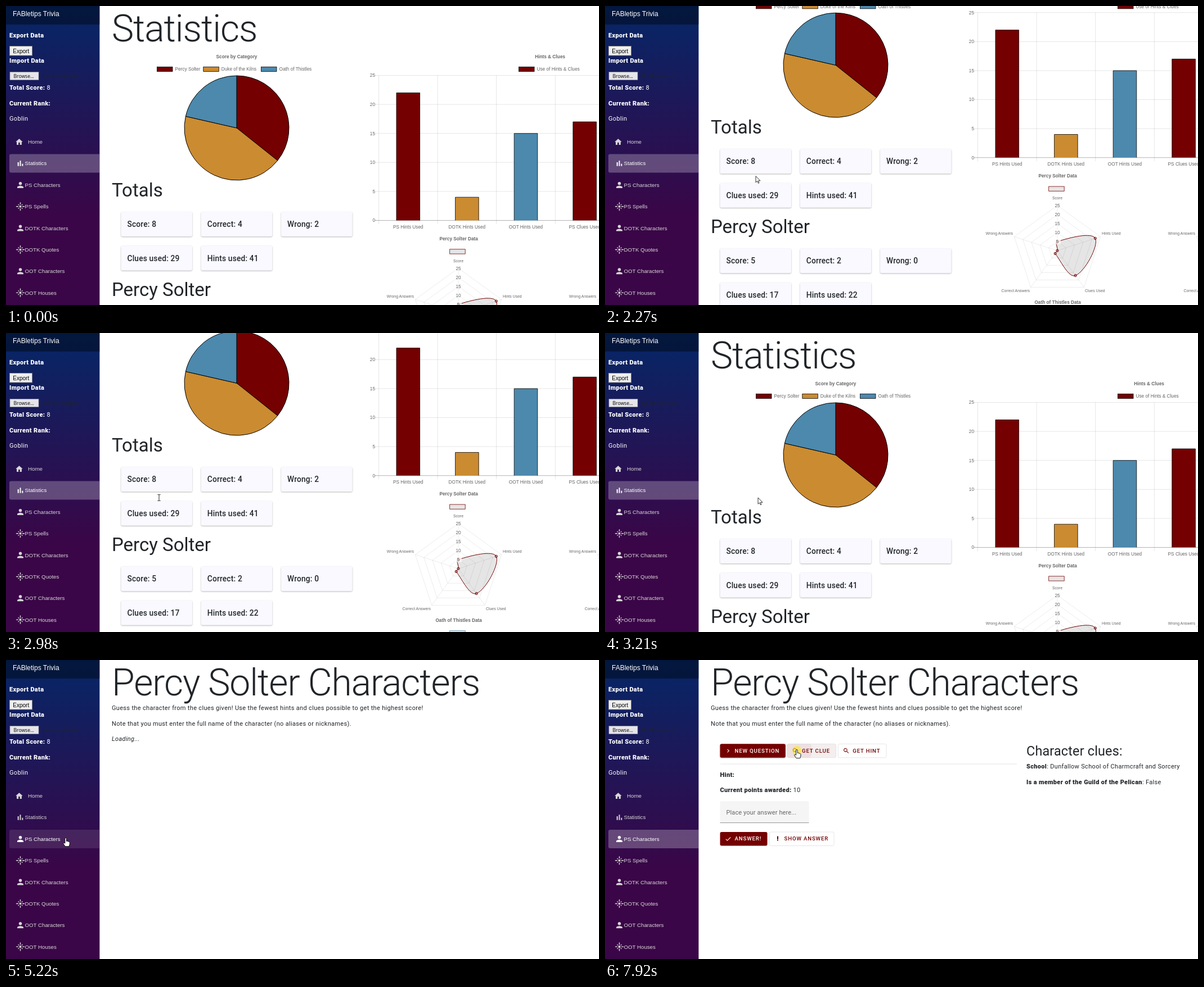
An HTML page for the animation above (7.99 s loop, 1054 by 532 pixels).

```html
<!DOCTYPE html>
<html lang="en">
<head>
<meta charset="utf-8">
<title>Trivia statistics</title>
<style>
html, body { margin: 0; width: 100%; height: 100%; overflow: hidden; background: #fff; }
svg { display: block; width: 100vw; height: 100vh; cursor: default; }
text { font: 11px Roboto, sans-serif; letter-spacing: .325px; fill: #212529; white-space: pre; }
.b { font-weight: 900; }
.i { font-style: italic; }
.h1 { font-size: 66px; font-weight: 300; letter-spacing: -1.03px; }
.h2 { font-size: 33px; letter-spacing: 0; }
.h3 { font-size: 23.4px; letter-spacing: .17px; }
.label { font-size: 13.75px; font-weight: 500; letter-spacing: .17px; }
.btn { font-size: 9.63px; font-weight: 500; letter-spacing: .86px; fill: #740001; }
.btn.solid { fill: #fff; }
.hint { letter-spacing: .1px; fill: #666; }
.chart text { font: 8.25px "Liberation Sans", Arial, sans-serif; letter-spacing: 0; fill: #666; }
.chart .title { font-weight: 700; }
.chart .small { font-size: 6.9px; }
.side text { fill: #fff; }
.side .ui { font: 10px "Liberation Sans", Arial, sans-serif; letter-spacing: 0; }
.side .brand { font-size: 12px; }
.side .file { font: 8.6px "Open Sans", sans-serif; letter-spacing: 0; }
.side .dark { fill: #000; }
.side .faint { fill: #212529; }
.nav { fill: #d7d7d7; }
.side .nav text { font: 9.7px "Liberation Sans", Arial, sans-serif; letter-spacing: 0; fill: inherit; }
.raised { filter: drop-shadow(0 1px 1px rgba(0,0,0,.28)); }
</style>
</head>
<body>
<script>
const LOOP = 7990;
const RED = '#740001', GOLD = '#cb8b31', BLUE = '#4c89ad', GRID = 'rgba(0,0,0,.1)';
const WORKS = ['Percy Solter', 'Duke of the Kilns', 'Oath of Thistles'];

const text = (x, y, s, cls = '', anchor = 'start') =>
  `<text x="${x}" y="${y}" class="${cls}" text-anchor="${anchor}">${s}</text>`;
const rect = (x, y, w, h, fill, more = '') =>
  `<rect x="${x}" y="${y}" width="${w}" height="${h}" fill="${fill}" ${more}/>`;
const path = (d, more = '') => `<path d="${d}" ${more}/>`;
const icon = (name, x, y, k, more = '') =>
  `<g transform="translate(${x} ${y}) scale(${k})" ${more}>${path(ICONS[name])}</g>`;
const range = n => [...Array(n).keys()];

const ICONS = {
  home: 'M10 20v-6h4v6h5v-8h3L12 3 2 12h3v8z',
  bars: 'M5 9.2h3V19H5zM10.6 5h2.8v14h-2.8zm5.6 8H19v6h-2.8z',
  person: 'M12 12a4 4 0 1 0 0-8 4 4 0 0 0 0 8zm0 2c-2.67 0-8 1.34-8 4v2h16v-2c0-2.66-5.33-4-8-4z',
  flare: 'M1 11h6v2H1zM17 11h6v2h-6zM11 1h2v6h-2zM11 17h2v6h-2zM9 12a3 3 0 1 1 6 0 3 3 0 0 1-6 0z' +
    'M7.05 5.64l2.12 2.12-1.41 1.41-2.12-2.12zM16.95 5.64l1.41 1.41-2.12 2.12-1.41-1.41z' +
    'M7.76 14.83l1.41 1.41-2.12 2.12-1.41-1.41zM16.24 14.83l2.12 2.12-1.41 1.41-2.12-2.12z',
  chevron: 'M10 6L8.6 7.4l4.6 4.6-4.6 4.6L10 18l6-6z',
  search: 'M15.5 14h-.8l-.3-.3a6.5 6.5 0 1 0-.7.7l.3.3v.8l5 5 1.5-1.5zm-6 0a4.5 4.5 0 1 1 0-9 4.5 4.5 0 0 1 0 9z',
  check: 'M9 16.2L4.8 12l-1.4 1.4L9 19 21 7l-1.4-1.4z',
  bang: 'M10 3h4v11h-4zM10 17a2 2 0 1 0 4 0 2 2 0 0 0-4 0z'
};

// Sidebar
const SIDE = 166.4;
const NAV = [['home', 'Home'], ['bars', 'Statistics'], ['person', 'PS Characters'], ['flare', 'PS Spells'],
  ['person', 'DOTK Characters'], ['flare', 'DOTK Quotes'], ['person', 'OOT Characters'], ['flare', 'OOT Houses']];
const navItem = ([name, label], i) => {
  const y = 241.7 + i * 38.35;
  const mark = i ? icon(name, 17.25, y - 8.25, .6875) : icon(name, 15.9, y - 7.4, .63);
  return `<g class="nav">${path(`M${SIDE} ${y - 16.5}H9a3 3 0 0 0-3 3v27a3 3 0 0 0 3 3H${SIDE}z`, 'fill="#fff" fill-opacity="0"')}
    ${mark}${text(i ? 33.5 : 39, y + 3.4, label)}</g>`;
};
const sidebar = () => `<g class="side">
  ${rect(0, 0, SIDE, 532, 'url(#night)')}${rect(0, 0, SIDE, 33, 'rgba(0,0,0,.4)')}
  ${text(12, 18, 'FABletips Trivia', 'ui brand')}
  ${text(6, 55.8, 'Export Data', 'b')}
  ${rect(6.5, 71.5, 40, 16.5, '#efefef', 'stroke="#858585"')}${text(12.3, 83.5, 'Export', 'ui dark')}
  ${text(6, 100.6, 'Import Data', 'b')}
  ${rect(7, 117.5, 51, 14, '#e6e6ea', 'stroke="#8f8f9d" stroke-width=".7"')}${text(13.5, 128, 'Browse...', 'file dark')}
  ${text(65, 128, 'No file selected.', 'file faint')}
  ${text(6, 149.2, '<tspan class="b">Total Score:</tspan> 8')}
  ${text(6, 176.5, 'Current Rank:', 'b')}${text(6, 203.8, 'Goblin')}
  ${NAV.map(navItem).join('')}</g>`;

// Statistics page
const CARDS = [];
const section = (title, top, labels) => text(188, top, title, 'h2') + labels.map((s, i) => {
  const x = 204.5 + i % 3 * 142.3, y = top + 27 + (i > 2 ? 60.5 : 0);
  CARDS.push({ x, y });
  return rect(x, y, 126.5, 44, '#f9f9ff', 'rx="2.75" class="raised"') + text(x + 11, y + 27, s, 'label');
}).join('');

const legend = (x, y, fill, s = '', stroke = '#000') =>
  rect(x, y, 27.5, 8.25, fill, `stroke="${stroke}" stroke-width=".8"`) + text(x + 32, y + 7, s);

const polar = (cx, cy, r, turn) =>
  [cx + r * Math.sin(turn * 2 * Math.PI), cy - r * Math.cos(turn * 2 * Math.PI)];

const pie = () => {
  const [cx, cy, r] = [410, 217, 93];
  let sum = 0;
  return [[5, RED], [6, GOLD], [3, BLUE]].map(([n, fill]) => {
    const from = polar(cx, cy, r, sum / 14), to = polar(cx, cy, r, (sum += n) / 14);
    return path(`M${cx} ${cy}L${from}A${r} ${r} 0 0 1 ${to}Z`, `fill="${fill}" stroke="#000"`);
  }).join('') + text(410, 92.5, 'Score by Category', 'title', 'middle') +
    [268.5, 350.8, 453.5].map((x, i) => legend(x, 108.3, [RED, GOLD, BLUE][i], WORKS[i])).join('');
};

const barChart = () => {
  const base = 381.5, unit = 10.32, step = 104.6;
  return text(967, 92.5, 'Hints &amp; Clues', 'title', 'middle') +
    legend(911.5, 108.3, RED, 'Use of Hints &amp; Clues') +
    range(6).map(i => path(`M655 ${base - i * 5 * unit}H1054`, `stroke="${i ? GRID : 'rgba(0,0,0,.3)'}"`) +
      text(656, base - i * 5 * unit + 2.8, i * 5, '', 'end')).join('') +
    range(4).map(i => path(`M${662.5 + i * step} 123.5V388`, `stroke="${GRID}"`)).join('') +
    [[22, RED, 'PS Hints Used'], [4, GOLD, 'DOTK Hints Used'], [15, BLUE, 'OOT Hints Used'], [17, RED, 'PS Clues Used']]
      .map(([n, fill, s], i) => {
        const x = 714.8 + i * step;
        return path(`M${x - 20.8} ${base}v${-n * unit}h41.6v${n * unit}`, `fill="${fill}" stroke="#000" stroke-width=".8"`) +
          text(x, 395.8, s, '', 'middle');
      }).join('');
};

// Closed curve through the points, with the handles scaled by neighbour distance
const smoothLoop = pts => {
  const n = pts.length, at = i => pts[(i + n) % n];
  const dist = (a, b) => Math.hypot(a[0] - b[0], a[1] - b[1]);
  const handle = (i, side) => {
    const a = at(i - 1), c = at(i), b = at(i + 1), d = side < 0 ? dist(a, c) : dist(c, b);
    const k = side * .4 * d / (dist(a, c) + dist(c, b));
    return [c[0] + k * (b[0] - a[0]), c[1] + k * (b[1] - a[1])];
  };
  return `M${at(0)}` + pts.map((_, i) => `C${handle(i, 1)} ${handle(i + 1, -1)} ${at(i + 1)}`).join('');
};

const radar = (cx, values) => {
  const cy = 547, point = (v, i) => polar(cx, cy, v * 3.22, i / 5);
  const pts = values.map(point);
  const web = range(5).map(k => path(`M${range(5).map(i => point(k * 5 + 5, i)).join('L')}Z`)).join('') +
    range(5).map(i => path(`M${cx} ${cy}L${point(25, i)}`)).join('');
  return `<g fill="none" stroke="${GRID}" stroke-width=".8">${web}</g>` +
    text(cx, 455.7, 'Score', 'small', 'middle') + text(cx + 79, 519, 'Hints Used', 'small') +
    text(cx + 49, 620.7, 'Clues Used', 'small') + text(cx - 49, 620.7, 'Correct Answers', 'small', 'end') +
    text(cx - 79, 519, 'Wrong Answers', 'small', 'end') +
    (pts.length ? path(smoothLoop(pts), `fill="${GRID}" stroke="${RED}"`) : '') +
    pts.map(([x, y]) => `<circle cx="${x}" cy="${y}" r="2.1" fill="${GRID}" stroke="${RED}"/>`).join('') +
    range(5).map(k => rect(cx - 6, cy - 21 - k * 16.1, 12, 9.5, 'rgba(255,255,255,.7)') +
      text(cx, cy - 13 - k * 16.1, k * 5 + 5, '', 'middle')).join('');
};

const stats = () => `<g id="stats">${text(188, 63, 'Statistics', 'h1')}
  <g class="chart">${pie()}${barChart()}
    ${text(804.7, 417, WORKS[0] + ' Data', 'title', 'middle')}${legend(788.7, 432.8, GRID, '', RED)}
    ${radar(804, [5, 22, 17, 2, 0])}${radar(1128, [])}
    ${text(804.7, 641.5, WORKS[2] + ' Data', 'title', 'middle')}${legend(788.7, 657.5, GRID, '', BLUE)}</g>
  ${section('Totals', 339, ['Score: 8', 'Correct: 4', 'Wrong: 2', 'Clues used: 29', 'Hints used: 41'])}
  ${section(WORKS[0], 516, ['Score: 5', 'Correct: 2', 'Wrong: 0', 'Clues used: 17', 'Hints used: 22'])}
  ${text(188, 691, WORKS[1], 'h2')}</g>`;

// Question page
const button = (id, x, y, w, name, label, solid, more = '') =>
  rect(x, y, w, 24.5, solid ? RED : '#fff',
    `id="${id}" rx="2.75" ${solid ? more : 'stroke="#e0e0e0" stroke-width=".8"'}`) +
  icon(name, x + 8.2, y + 6, .52, `fill="${solid ? '#fff' : RED}"`) +
  text(x + 26, y + 15.4, label, solid ? 'btn solid' : 'btn');

const quiz = () => `<g id="quiz">${text(188, 63, WORKS[0] + ' Characters', 'h1')}
  ${text(188, 89.4, 'Guess the character from the clues given! Use the fewest hints and clues possible to get the highest score!')}
  ${text(188, 116.9, 'Note that you must enter the full name of the character (no aliases or nicknames).')}
  <g id="loading">${text(188, 144.2, 'Loading...', 'i')}</g>
  <g id="question">
    ${button('newQ', 204.5, 149.3, 116.3, 'chevron', 'NEW QUESTION', true, 'class="raised"')}
    ${button('clue', 324, 149.3, 86.5, 'search', 'GET CLUE')}
    ${button('getHint', 414.3, 149.3, 85.7, 'search', 'GET HINT')}
    <circle id="ripple" cx="341" cy="161" r="27" fill="${RED}" fill-opacity=".06" clip-path="url(#clueBox)"/>
    ${path('M205 185H732', `stroke="${GRID}"`)}
    ${text(204.5, 207.7, 'Hint:', 'b')}${text(204.5, 235.2, '<tspan class="b">Current points awarded:</tspan> 10')}
    ${path('M204.5 290v-36a2.75 2.75 0 0 1 2.75-2.75h152.5a2.75 2.75 0 0 1 2.75 2.75v36z', 'id="field"')}
    ${path('M204.5 289.6H362.5', 'id="line"')}
    ${text(215.5, 274.5, 'Place your answer here...', 'hint')}
    ${button('answer', 204.5, 306, 84, 'check', 'ANSWER!', true)}
    ${button('show', 292.5, 306, 114.5, 'bang', 'SHOW ANSWER')}
    ${text(749, 170.3, 'Character clues:', 'h3')}
    ${text(749, 193.4, '<tspan class="b">School</tspan>: Dunfallow School of Charmcraft and Sorcery')}
    ${text(749, 220.9, '<tspan class="b">Is a member of the Guild of the Pelican</tspan>: False')}
  </g></g>`;

// Pointer shapes, with the hot spot at 0,0
const pointer = () => `<circle id="click" r="8" fill="#ffe81e" fill-opacity=".6"/><g id="pointer">
  ${path('M0 0V11.3L2.6 8.9 4.4 12.8 6 12.1 4.3 8.3H8Z', 'id="arrow" fill="#fff" stroke="#000" stroke-width=".8"')}
  ${path('M-1.4 8.4V.8A1.3 1.3 0 0 1 1.2.8V5.4l1-.2 1 .5h1.1l.8.7 1 .1.8.9V11L5.7 14.7H-1L-4.4 9.8Q-4.8 8.1-3.1 8.2L-1.4 9.2Z',
    'id="hand" fill="#fff" stroke="#000" stroke-width=".9"')}
  ${path('M-2.5-5.5H-.5L0-5 .5-5.5H2.5M0-5V5M-2.5 5.5H-.5L0 5 .5 5.5H2.5', 'id="beam" fill="none" stroke="#222"')}</g>`;

document.body.innerHTML = `<svg viewBox="0 0 1054 532"><defs>
  <linearGradient id="night" x2="0" y2="1"><stop stop-color="#052767"/><stop offset=".7" stop-color="#3a0647"/></linearGradient>
  <clipPath id="clueBox">${rect(324, 149.3, 86.5, 24.5, '#000', 'rx="2.75"')}</clipPath></defs>
  ${stats()}${quiz()}${sidebar()}${pointer()}</svg>`;

const $ = id => document.getElementById(id);
const cards = document.querySelectorAll('#stats .raised');
const navs = document.querySelectorAll('.nav');
const show = (id, on) => { $(id).style.display = on ? '' : 'none'; };
const inside = (x, y, l, t, r, b) => x >= l && x <= r && y >= t && y <= b;
const ease = (t, a, b) => { const u = Math.min(1, Math.max(0, (t - a) / (b - a))); return u * u * (3 - 2 * u); };

// time, x, y
const TRACK = [[1050, 383, 524], [1250, 331, 467], [1570, 284, 367], [1810, 270, 326], [2500, 267, 291],
  [2640, 273, 293], [2980, 272, 293], [3570, 272, 293], [3750, 240, 296], [4150, 132, 312], [4400, 106.3, 317],
  [5580, 106.3, 317], [5780, 140, 313], [6120, 235, 301], [6330, 268, 297], [6560, 285, 280],
  [7130, 298, 209], [7450, 306, 170], [7700, 328, 164], [7870, 341, 160], [LOOP, 341, 160]];
const locate = t => {
  const i = Math.max(1, TRACK.findIndex(k => k[0] > t));
  const [a, b] = [TRACK[i - 1], TRACK[i]], u = (t - a[0]) / (b[0] - a[0]);
  return [a[1] + (b[1] - a[1]) * u, a[2] + (b[2] - a[2]) * u];
};

function draw(now) {
  const t = now % LOOP, visible = t >= 1050;
  const [x, y] = visible ? locate(t) : [-99, -99];
  const scroll = 140 * (ease(t, 1830, 2450) - ease(t, 2930, 3210));
  const onQuiz = t >= 5160, ready = t >= 5580;

  show('stats', !onQuiz);
  show('quiz', onQuiz);
  show('loading', !ready);
  show('question', ready);
  $('stats').setAttribute('transform', `translate(0 ${-scroll})`);

  let onCard = false;
  cards.forEach((el, i) => {
    const c = CARDS[i], over = !onQuiz && inside(x, y + scroll, c.x, c.y, c.x + 126.5, c.y + 44);
    onCard = onCard || over;
    el.setAttribute('fill', over ? '#eeeef3' : '#f9f9ff');
  });

  const onNav = inside(x, y, 6, 302, 166, 335);
  navs.forEach((el, i) => {
    const active = ready ? i === 2 : !onQuiz && i === 1;
    const over = i === 2 && onNav;
    el.firstElementChild.setAttribute('fill-opacity', active ? .25 : over ? .1 : 0);
    el.style.fill = active || over ? '#fff' : '#d7d7d7';
  });

  const onField = ready && inside(x, y, 204.5, 251, 362.5, 290);
  const onNew = ready && inside(x, y, 204.5, 149, 320.7, 174);
  const onClue = ready && inside(x, y, 324, 149, 410.5, 174);
  $('field').setAttribute('fill', onField ? '#ebebeb' : '#f5f5f5');
  $('line').setAttribute('stroke', onField ? '#333' : '#949494');
  $('newQ').setAttribute('fill', onNew ? '#7f1415' : RED);
  $('clue').setAttribute('fill', onClue ? '#f4eeee' : '#fff');

  const clicked = t >= 7870;
  show('ripple', clicked);
  show('click', clicked || t >= 5010 && t < 5060);
  $('click').setAttribute('transform', `translate(${x} ${y + 1})`);

  const beam = onField || t >= 2400 && t < 3100;
  const hand = !beam && (onCard || onNav || onNew || onClue);
  show('pointer', visible);
  show('beam', beam);
  show('hand', hand);
  show('arrow', !beam && !hand);
  $('pointer').setAttribute('transform', `translate(${x} ${y})`);
  requestAnimationFrame(draw);
}
draw(0);
</script>
</body>
</html>
```
